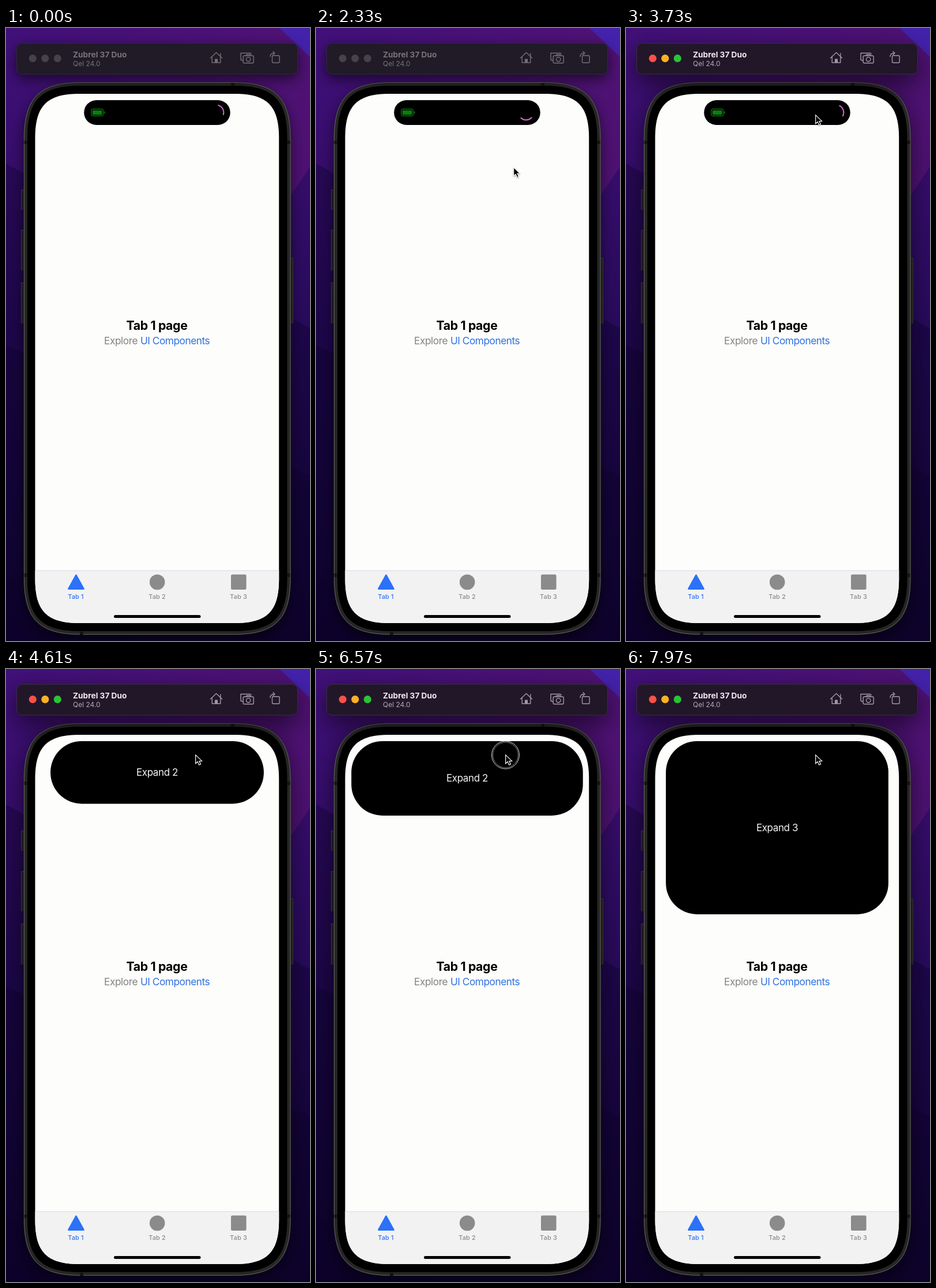
An HTML page with a canvas for the animation above (8 s loop, 527 by 1062 pixels).

```html
<!DOCTYPE html>
<html lang="en">
<head>
<meta charset="utf-8">
<title>Expanding island</title>
<style>
html, body { margin: 0; width: 100%; height: 100%; overflow: hidden; background: #16063a; }
canvas { display: block; width: 527px; height: 1062px; }
</style>
</head>
<body>
<canvas id="stage" width="527" height="1062"></canvas>
<script>
const ctx = document.getElementById('stage').getContext('2d');
const W = 527, H = 1062, CX = 262, TAU = Math.PI * 2;
const LOOP = 8000, FOCUS = 2950, OPEN = 3838, GROW = 6940;
const FONT = 'Inter, "Liberation Sans", sans-serif';

function trace(pts) {
  ctx.beginPath();
  pts.forEach(([x, y]) => ctx.lineTo(x, y));
}

function poly(color, ...pts) {
  trace(pts);
  ctx.closePath();
  ctx.fillStyle = color;
  ctx.fill();
}

function line(...pts) {
  trace(pts);
  ctx.stroke();
}

function box(x, y, w, h, r, color) {
  ctx.beginPath();
  ctx.roundRect(x, y, w, h, r);
  ctx.fillStyle = color;
  ctx.fill();
}

function outline(x, y, w, h, r) {
  ctx.beginPath();
  ctx.roundRect(x, y, w, h, r);
  ctx.stroke();
}

function disc(x, y, r, color) {
  ctx.beginPath();
  ctx.arc(x, y, r, 0, TAU);
  ctx.fillStyle = color;
  ctx.fill();
}

function arc(x, y, r, from = 0, to = TAU) {
  ctx.beginPath();
  ctx.arc(x, y, r, from, to);
  ctx.stroke();
}

function pen(color, width) {
  ctx.strokeStyle = color;
  ctx.lineWidth = width;
  ctx.lineCap = ctx.lineJoin = 'round';
}

// Runs paint with a drop shadow
function shaded(blur, drop, alpha, paint) {
  ctx.save();
  ctx.shadowColor = `rgba(0,0,0,${alpha})`;
  ctx.shadowBlur = blur;
  ctx.shadowOffsetY = drop;
  paint();
  ctx.restore();
}

// Rounded rectangle with continuous corners, built one corner per quarter turn
function smoothPath(x, y, w, h, r) {
  const e = r * 1.3, d = r * 0.348;
  ctx.beginPath();
  for (let i = 0; i < 4; i++) {
    const a = i * Math.PI / 2, c = Math.round(Math.cos(a)), s = Math.round(Math.sin(a));
    const hw = (i % 2 ? h : w) / 2, hh = (i % 2 ? w : h) / 2;
    const at = (dx, dy) => {
      const px = hw - dx, py = dy - hh;
      return [x + w / 2 + px * c - py * s, y + h / 2 + px * s + py * c];
    };
    ctx.lineTo(...at(e, 0));
    ctx.bezierCurveTo(...at(d, 0), ...at(0, d), ...at(0, e));
  }
  ctx.closePath();
}

function smoothBox(x, y, w, h, r, color) {
  smoothPath(x, y, w, h, r);
  ctx.fillStyle = color;
  ctx.fill();
}

function text(str, x, y, size, color, weight = 400, spacing = 0, align = 'left') {
  ctx.font = `${weight} ${size}px ${FONT}`;
  ctx.letterSpacing = spacing + 'px';
  ctx.textAlign = align;
  ctx.fillStyle = color;
  ctx.fillText(str, x, y);
}

function gradient(x, y, ...colors) {
  const g = ctx.createLinearGradient(0, 0, x, y);
  colors.forEach((c, i) => g.addColorStop(i / (colors.length - 1), c));
  return g;
}

// Critically damped spring, 0 to 1
function spring(ms) {
  const u = Math.max(0, ms) * 0.00356;
  return 1 - (1 + u) * Math.exp(-u);
}

function drawWallpaper() {
  ctx.fillStyle = gradient(0, H, '#41107a', '#350c6a', '#260a5a', '#1c0748', '#10052e');
  ctx.fillRect(0, 0, W, H);
  poly(gradient(W, 0, 'rgba(84,18,116,0)', 'rgba(84,18,116,.8)'),
    [0, 0], [W, 0], [W, 240], [480, 310], [0, 90]);
  poly('#4422ac', [474, 0], [W, 0], [W, 50]);
  const ridge = (left, right) => poly('rgba(12,2,44,.36)', [0, left], [W, right], [W, H], [0, H]);
  ridge(235, 520);
  ridge(550, 775);
  ridge(948, 1210);
}

function drawToolbar(active) {
  const paint = () => box(18, 26, 488, 54.5, 10, active ? '#221728' : '#201b27');
  shaded(active ? 44 : 24, active ? 14 : 8, 0.6, paint);
  pen(active ? '#392d44' : '#302a38', 1);
  outline(18.5, 26.5, 487, 53.5, 9.5);

  ['#fb5148', '#fcb125', '#29c436'].forEach((c, i) =>
    disc(46.3 + i * 21.5, 52.7, 6.6, active ? c : '#454249'));
  text('Zubrel 37 Duo', 116, 50.5, 13.7, active ? '#f1edf3' : '#77737a', 700);
  text('Qel 24.0', 116, 66, 12, active ? '#b3aab8' : '#77737a');

  const ink = active ? '#a198a8' : '#746f78';
  pen(ink, 1.4);
  // Home
  line([354.5, 52], [364.5, 42.5], [374.5, 52]);
  line([357.2, 50], [357.2, 60], [371.8, 60], [371.8, 44]);
  box(362, 53.5, 5, 6.5, 0.5, ink);
  // Camera
  line([410, 56.5], [407, 55], [407, 43.5], [423.5, 43.5], [425.3, 45]);
  outline(411.2, 48, 18, 12.8, 2);
  line([416, 47.5], [417.5, 46], [423, 46], [424.5, 47.5]);
  arc(420.2, 54.3, 3.7);
  // Rotate
  outline(461.5, 47.8, 12.6, 12.4, 2);
  arc(464, 49.5, 6, Math.PI, Math.PI * 1.5);
  line([463, 40.8], [466, 43.5], [463, 46.2]);
}

function drawPhone(active) {
  const button = (x, y, h) => {
    box(x, y, 7, h, 1.5, '#26242c');
    ctx.fillStyle = '#45433f';
    ctx.fillRect(x, y, 7, 1);
    ctx.fillRect(x < CX ? x : x + 6, y, 1, h);
  };
  button(26, 280, 35);
  button(26, 350, 70);
  button(26, 441, 71);
  button(491, 398, 114);

  shaded(active ? 40 : 24, 10, 0.55, () => smoothBox(31, 94, 462.5, 957, 76, '#262724'));
  smoothPath(31.5, 94.5, 461.5, 956, 75.5);
  pen('#66675f', 1);
  ctx.stroke();
  // Antenna gaps
  ctx.fillStyle = '#141412';
  for (const side of [-1, 1]) {
    for (const y of [195, 945]) ctx.fillRect(CX + side * 228 - 2.5, y, 5, 6);
    ctx.fillRect(CX + side * 131 - 3, CX && 570.5 - side * 475.5, 6, 5);
  }
  smoothBox(37, 100, 450.5, 945, 70, '#000');
}

function drawScreen() {
  ctx.save();
  smoothPath(50.5, 114, 422.7, 917, 59);
  ctx.clip();
  ctx.fillStyle = '#fdfdfc';
  ctx.fillRect(0, 0, W, H);
  ctx.fillStyle = '#f2f2f3';
  ctx.fillRect(0, 940, W, 100);
  ctx.fillStyle = '#d9d9e2';
  ctx.fillRect(0, 939.5, W, 1);
  ctx.restore();

  text('Tab 1 page', CX - 0.5, 523, 21.3, '#000', 700, -0.4, 'center');
  text('Explore', 170, 547.5, 17.3, '#828282', 400, -0.45);
  text('UI Components', 233, 547.5, 17.3, '#2f71e0', 400, -0.5);

  const blue = '#2c71f8', gray = '#8b8b8b';
  poly(blue, [121.5, 948], [134.6, 971.6], [108.4, 971.6]);
  pen(blue, 2.6);
  ctx.stroke();
  disc(262.2, 960, 13.3, gray);
  box(390, 946.7, 26.6, 26.4, 2.5, gray);
  for (let n = 1; n <= 3; n++) {
    text('Tab ' + n, 141 * n - 20, 989, 11, n === 1 ? blue : gray, 500, 0.1, 'center');
  }
  box(187, 1017, 150.5, 5, 2.5, '#000');
}

function islandSize(t) {
  if (t < OPEN) return [253.5, 43];
  const [began, from, to] = t < GROW ? [OPEN, 43, 129] : [GROW, 129, 323];
  const p = spring(t - began);
  return [269 + 132.5 * p, from + (to - from) * p];
}

function drawIsland(t) {
  const [w, h] = islandSize(t);
  box(CX - w / 2, 125, w, h, Math.min(54, h / 2), '#000');
  if (t >= OPEN) {
    text('Expand ' + (t < GROW ? 2 : 3), CX, 125 + h / 2 + 6, 17.1, '#f4f4f4', 400, -0.45, 'center');
    return;
  }
  const green = '#0a7d10';
  pen(green, 1.2);
  outline(147.8, 140.4, 20.8, 12, 3.4);
  box(149.8, 142.4, 16.8, 8, 1.8, green);
  box(170, 144.2, 1.5, 4.4, 0.8, green);

  const turn = t / 1846 * TAU;
  const mid = turn + 0.4 * Math.sin(turn) - 0.5;
  pen('#d869d4', 2);
  arc(364.3, 146.3, 13, mid - TAU / 8, mid + TAU / 8);
}

function drawPointer(t) {
  const pressed = [FOCUS, OPEN, GROW].some((end, i) => t < end && t >= end - (i < 2 ? 90 : 400));
  if (pressed) {
    pen('#d8d8d8', 1);
    arc(328.5, 149, 24);
    pen('#8a8a8a', 1);
    arc(328.5, 149, 22);
  }
  if (t < 1800) return;
  // Eases in from below the stage
  const left = Math.max(0, 1 - (t - 1800) / 900) ** 2.6;
  const restY = t < OPEN ? 150 : 148;
  ctx.save();
  ctx.translate(328 + 142 * left, restY + 920 * left);
  shaded(2, 1, 0.35, () => {
    poly('#000', [0.7, 0.8], [0.7, 15.8], [4.2, 12.6], [6.6, 18.2], [9.4, 17], [7, 11.6], [11.6, 11.4]);
    pen('#fff', 1.2);
    ctx.lineJoin = 'miter';
    ctx.stroke();
  });
  ctx.restore();
}

function draw(t) {
  const active = t >= FOCUS;
  drawWallpaper();
  drawPhone(active);
  drawToolbar(active);
  drawScreen();
  drawIsland(t);
  drawPointer(t);
}

const start = performance.now();
function tick() {
  draw((performance.now() - start) % LOOP);
  requestAnimationFrame(tick);
}
tick();
</script>
</body>
</html>
```
